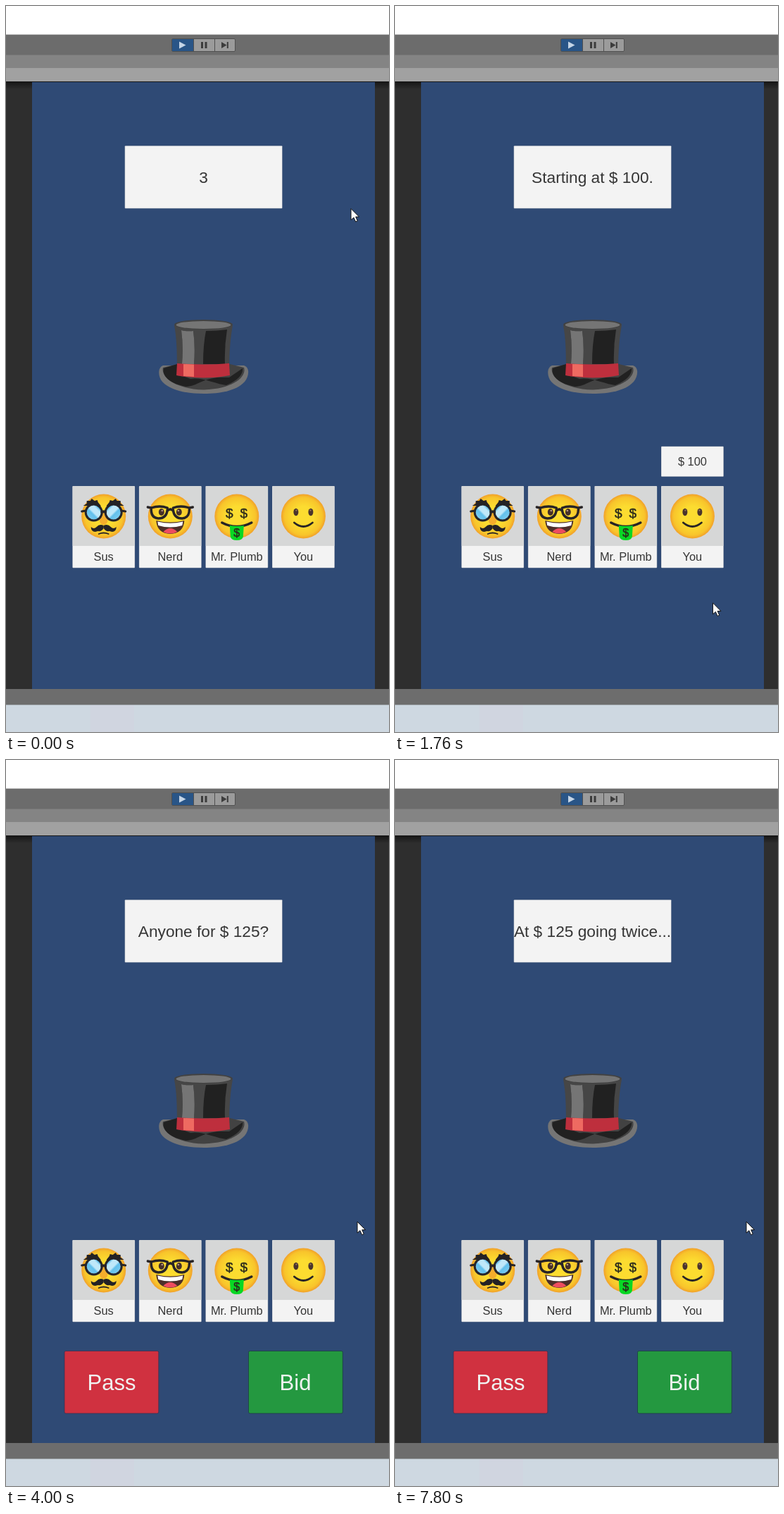
Animation, 544 px wide and 1030 px high, one loop 8000 ms. Source, as an HTML page:

```html
<!DOCTYPE html>
<html lang="en">
<head>
<meta charset="utf-8">
<title>Auction</title>
<style>
  html, body { margin: 0; width: 100%; height: 100%; overflow: hidden; }
  svg { display: block; width: 544px; height: 1030px; }
  text { font-family: "Liberation Sans", Arial, sans-serif; text-anchor: middle; fill: #353535; }
  .panel { fill: #f3f3f3; stroke: #23385c; stroke-opacity: .5; stroke-width: .6; }
  .big { font-size: 31px; fill: #f1f3f1; }
  .small { font-size: 16.4px; }
  .line { fill: none; stroke: #282426; stroke-linecap: round; stroke-linejoin: round; }
</style>
</head>
<body>
<svg viewBox="0 0 544 1030">
  <defs>
    <radialGradient id="skin">
      <stop offset=".45" stop-color="#fcdc30"/>
      <stop offset=".85" stop-color="#f8c42b"/>
      <stop offset="1" stop-color="#f1a02a"/>
    </radialGradient>
    <linearGradient id="shade" x2="0" y2="1">
      <stop stop-color="#151515"/>
      <stop offset="1" stop-color="#2e2e2e"/>
    </linearGradient>
    <linearGradient id="lens" x2="1" y2="1">
      <stop offset=".2" stop-color="#52b5e4"/>
      <stop offset=".3" stop-color="#bfe8fa"/>
      <stop offset=".5" stop-color="#bfe8fa"/>
      <stop offset=".58" stop-color="#62c0ec"/>
      <stop offset="1" stop-color="#8fd4f3"/>
    </linearGradient>
  </defs>

  <!-- editor window -->
  <rect width="544" height="1030" fill="#fff"/>
  <rect y="40" width="544" height="30" fill="#6c6c6c"/>
  <rect y="40" width="544" height="1" fill="#bbb"/>
  <rect y="69.5" width="544" height="18.5" fill="#848484"/>
  <rect y="88" width="544" height="20" fill="#a1a1a1"/>
  <rect y="107" width="544" height="862" fill="#2e2e2e"/>
  <rect y="107" width="544" height="11" fill="url(#shade)"/>
  <rect x="37" y="108" width="487" height="861" fill="#2f4a75"/>
  <rect y="969" width="544" height="23" fill="#6d6d6d"/>
  <rect y="991.5" width="544" height="39" fill="#ced8e1"/>
  <rect x="120" y="992" width="62" height="38" fill="#d0d5e0"/>
  <rect x="235.500" y="46.500" width="90" height="18" rx="1.500" fill="#9b9b9b" stroke="#505050"/>
  <path d="M236 47h30v17h-30z" fill="#295587"/>
  <path d="M266.500 47v17M296.500 47v17" stroke="#505050"/>
  <path d="M246 50.500l9.500 5-9.500 5z" fill="#c5d5e6"/>
  <path d="M277 51h3v9h-3zM282.500 51h3v9h-3zM306 51l7.500 4.500-7.500 4.500zM313.800 51h2v9h-2z" fill="#3c3c3c"/>

  <!-- announcement -->
  <rect class="panel" x="168.700" y="198.200" width="223.800" height="89" rx="1"/>
  <text id="title" x="280.500" y="251" font-size="22.7"></text>

  <!-- top hat -->
  <path d="M223 510C215 513 216 526 222 533C234 546 258 550 281 550S327 546 339 533C345 526 347 513 338 510z" fill="#757575"/>
  <path d="M223 513C220 525 237 543 281 544.500C325 543 342 525 338 513L318 508H244z" fill="#424242"/>
  <path d="M224 514C221 524 232 536 256 540C272 539 276 530 300 527L317 527L336 514C337 522 330 531 313 538C300 537 278 526 262 529L243 522L243 508z" fill="#212121"/>
  <path d="M239 453C243 475 243 495 243 524Q280 532 317 524C317 495 318 475 322 453z" fill="#464646"/>
  <path d="M249 460Q257 462 266 461Q269 483 267 508H250Q252 482 249 460zM284 461Q300 461 314 459Q310 484 311 508H280Q280 480 284 461z" fill="#212121"/>
  <path d="M249 460Q257 462 266 461Q269 483 267 508H250Q252 482 249 460z" fill="#757575"/>
  <path d="M243 507Q280 510 317 507L318 524Q281 531 242 524z" fill="#be2f3d"/>
  <path d="M252 508L267 508.500V526L252 525z" fill="#ee6a61"/>
  <ellipse cx="280.500" cy="452" rx="41.500" ry="7" fill="#424242"/>
  <ellipse cx="280.500" cy="452.500" rx="39" ry="5.500" fill="#757575"/>

  <g id="cards"></g>

  <!-- offer above a card -->
  <g id="offer">
    <rect class="panel" x="-44.400" y="624.700" width="88.800" height="43" rx="1"/>
    <text id="price" class="small" y="652"></text>
  </g>

  <g id="buttons">
    <rect x="83" y="838.500" width="133.800" height="88.500" rx="2" fill="#d03140" stroke="#3f2f50" stroke-width=".8"/>
    <rect id="bid" x="344.500" y="838.500" width="133.800" height="88.500" rx="2" stroke="#1c3c45" stroke-width=".8"/>
    <text class="big" x="150" y="893.500">Pass</text>
    <text class="big" x="411" y="893.500">Bid</text>
  </g>

  <path id="cursor" d="M0 0V16L3.900 12.600L6.600 18.600L9.300 17.400L6.700 11.600H11.500z" fill="#fff" stroke="#111" stroke-width="1"/>
</svg>

<script>
const $ = id => document.getElementById(id);
const cardX = [138.7, 233.3, 327.8, 422.4];

const mirror = shape => shape + `<g transform="scale(-1 1)">${shape}</g>`;
const dollar = (x, y, size) =>
  `<text x="${x}" y="${y}" font-size="${size}" style="fill:#2b2a1c" stroke="#2b2a1c" stroke-width=".5">$</text>`;

const faces = {
  Sus: `<path d="M-4 -7Q-9 12 0 12T4 -7z" fill="#f4ad2c"/>` +
    mirror(`<circle cx="14" cy="-5.500" r="11.500" fill="url(#lens)" stroke="#26252b" stroke-width="3"/>
      <path class="line" d="M25 -8L31 -7M-1 -6Q1 -8 3 -6" stroke-width="3"/>
      <path d="M4 -15L8 -20L9 -23L13 -22L17 -25L19 -22L24 -22L24 -18L29 -15L22 -15L18 -17L11 -16L6 -12z" fill="#242225"/>
      <path d="M0 13Q6 10 10 15Q14 19 18 15Q18 22 12 22L8 21Q3 22 0 17z" fill="#242225"/>`) +
    `<path class="line" d="M-7 25Q0 22 7 25" stroke="#674013" stroke-width="1.800"/>`,
  Nerd: mirror(`<ellipse cx="12.500" cy="-6" rx="4" ry="5" fill="#46302a"/>
      <circle cx="11.500" cy="-8" r="1.300" fill="#b79685"/>
      <path class="line" d="M4 -12Q15 -16 27 -12Q28 2 17 3Q5 3 4 -10zM27 -12L32 -13M0 -10Q2 -10 4 -8" stroke-width="3.400"/>`) +
    `<path d="M-20 6Q0 11 20 6Q19 24 0 25Q-19 24 -20 6z" fill="#4d2f2a"/>
     <path d="M-18 7.500Q0 12 18 7.500L17 13Q0 18 -17 13z" fill="#fff"/>
     <path d="M-10 22Q0 12 10 22Q0 27 -10 22z" fill="#ee4d5f"/>`,
  "Mr. Plumb": dollar(-10.5, 2, 19) + dollar(10, 2, 19) +
    `<path class="line" d="M-21 9Q0 20 21 9" stroke="#5b3521" stroke-width="3.500"/>
     <path d="M-10 13Q0 15 10 13L9 29Q8 34 0 34T-9 29z" fill="#08d724"/>` + dollar(0, 28.5, 16),
  You: mirror(`<ellipse cx="10.500" cy="-6" rx="3.500" ry="5.200" fill="#4a342c"/>
      <circle cx="10" cy="-8.500" r="1.200" fill="#8d6b57"/>`) +
    `<path class="line" d="M-13 9Q0 20 13 9" stroke="#5d3a22" stroke-width="2.800"/>`
};

$("cards").innerHTML = Object.entries(faces).map(([name, face], i) => `
  <g transform="translate(${cardX[i]} 724)">
    <rect class="panel" x="-44.400" y="-43" width="88.800" height="116.300" rx="1"/>
    <rect x="-44" y="-42.700" width="88" height="84.700" fill="#d6d7d7"/>
    <circle r="31.500" fill="url(#skin)"/>${face}
    <text class="small" y="63">${name}</text>
  </g>`).join("");

// Each list gives the time in ms at which a new value starts.
const titles = [[0, "3"], [480, "Starting at $ 100."], [2600, "At $ 100 going once..."],
  [3720, "Anyone for $ 125?"], [6400, "At $ 125 going once..."], [7680, "At $ 125 going twice..."]];
const offers = [[0], [1520, 3, 100], [2600, 0, 100], [3720], [5360, 2, 125], [6400]];
const buttons = [[0, false], [480, true], [1520, false], [3720, true]];
const current = (list, t) => list.findLast(step => step[0] <= t);

// time, x, y of the pointer tip
const path = [[0, 490, 287.5], [320, 490, 288], [880, 500, 430], [1320, 441, 868], [1400, 440, 872],
  [1700, 441, 869], [1960, 516, 710], [2240, 491, 658], [2960, 496, 656], [3560, 499, 655], [8000, 499, 655]];

function pointer(t) {
  const i = path.findLastIndex(p => p[0] <= t);
  const [a, b] = [path[i], path[i + 1]];
  const k = (t - a[0]) / (b[0] - a[0]);
  const ease = k * k * (3 - 2 * k);
  return [1, 2].map(n => a[n] + (b[n] - a[n]) * ease);
}

function show(id, on) {
  $(id).setAttribute("visibility", on ? "visible" : "hidden");
}

function draw(now) {
  const t = now % 8000;
  $("title").textContent = current(titles, t)[1];

  const [, owner, amount] = current(offers, t);
  show("offer", amount);
  if (amount) {
    $("offer").setAttribute("transform", `translate(${cardX[owner]} 0)`);
    $("price").textContent = "$ " + amount;
  }

  show("buttons", current(buttons, t)[1]);
  $("bid").setAttribute("fill", t > 1360 && t < 1520 ? "#228b3d" : "#249840");
  $("cursor").setAttribute("transform", `translate(${pointer(t)})`);
  requestAnimationFrame(draw);
}
draw(performance.now());
</script>
</body>
</html>
```
